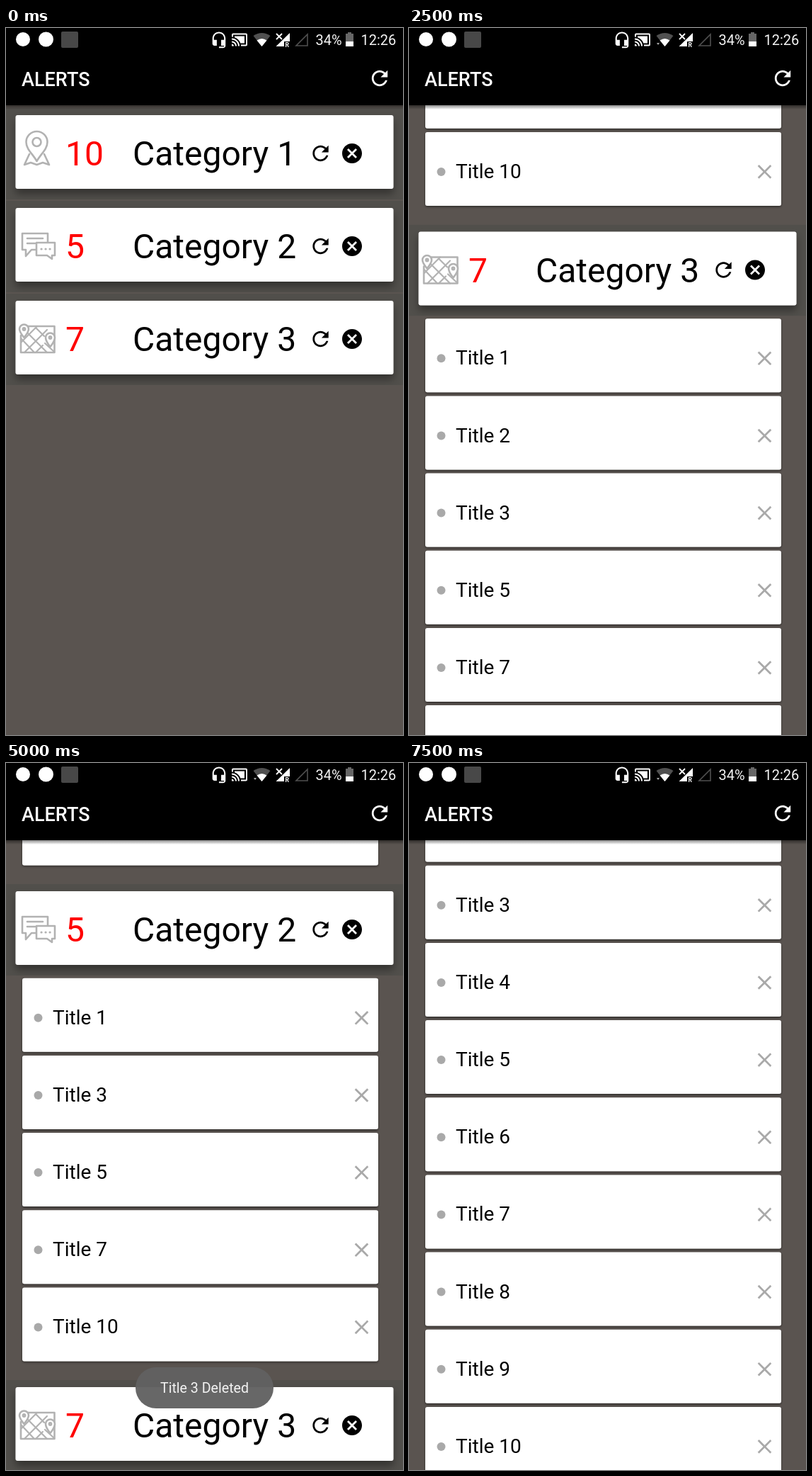
Animation of 561 by 998 pixels, one loop 8000 ms. Source, as an HTML page:

```html
<!DOCTYPE html>
<html lang="en">
<head>
<meta charset="utf-8">
<title>Alerts</title>
<style>
  html, body { margin: 0; width: 100%; height: 100%; overflow: hidden; background: #5a5450; }
  svg { display: block; width: 100vw; height: 100vh; }
  text { font-family: Roboto, "Noto Sans", sans-serif; }
  .head { font-size: 48px; }
  .item { font-size: 28px; }
  .status { font-size: 20px; fill: #f4f4f4; }
  .card { fill: #fff; }
  .line { fill: none; stroke: #b2b2b2; stroke-width: 2.6; stroke-linejoin: round; stroke-linecap: round; }
</style>
</head>
<body>
<svg viewBox="0 0 561 998" xmlns="http://www.w3.org/2000/svg">
  <defs>
    <linearGradient id="fade" x2="0" y2="1">
      <stop stop-opacity=".45"/><stop offset="1" stop-opacity="0"/>
    </linearGradient>
    <filter id="high" x="-5%" y="-20%" width="110%" height="150%">
      <feDropShadow dx="0" dy="7" stdDeviation="6" flood-opacity=".38"/>
    </filter>
    <filter id="low" x="-2%" y="-5%" width="104%" height="112%">
      <feDropShadow dx="0" dy="1.5" stdDeviation="1.6" flood-opacity=".5"/>
    </filter>
    <clipPath id="row"><rect y="-10" width="561" height="129"/></clipPath>

    <path id="refresh" transform="scale(1.4) translate(-12 -12)" d="M17.65 6.35C16.2 4.9 14.21 4 12 4c-4.42 0-7.99 3.58-7.99 8s3.57 8 7.99 8c3.73 0 6.84-2.55 7.73-6h-2.08c-.82 2.33-3.04 4-5.65 4-3.31 0-6-2.69-6-6s2.69-6 6-6c1.66 0 3.14.69 4.22 1.78L13 11h7V4l-2.35 2.35z"/>
    <path id="cancel" transform="scale(1.4) translate(-12 -12)" d="M12 2C6.47 2 2 6.47 2 12s4.47 10 10 10 10-4.47 10-10S17.53 2 12 2zm5 13.59L15.59 17 12 13.41 8.41 17 7 15.59 10.59 12 7 8.41 8.41 7 12 10.59 15.59 7 17 8.41 13.41 12 17 15.59z"/>
    <path id="close" transform="scale(1.4) translate(-12 -12)" d="M19 6.41L17.59 5 12 10.59 6.41 5 5 6.41 10.59 12 5 17.59 6.41 19 12 13.41 17.59 19 19 17.59 13.41 12z"/>

    <g id="icon0" class="line">
      <path d="M43.5 65C38 55 28.500 48 28.500 38a15 15 0 0 1 30 0C58.500 48 49 55 43.500 65z"/>
      <circle cx="43.500" cy="38" r="6"/>
      <path d="M33 55l-7 15 9-3 8.500 3 8.500-3 9 3-7-15"/>
    </g>
    <g id="icon1" class="line">
      <path d="M42 59H36l-8 9V59H23V36H59V48M30 43H52M30 50H41"/>
      <path d="M43 49H69V67H65V72L58 67H43z"/>
      <path d="M50 58h.1M56 58h.1M62 58h.1" stroke-width="3.200"/>
    </g>
    <g id="icon2" class="line">
      <path d="M31 36H68.500V73H21V49"/>
      <path d="M21 59L44 36M26 73L58 41M42 73L52 63M31 46L58 73M42 38L54 50M22 54L40 73M55 60L68 72" stroke-width="2.200"/>
      <path fill="#fff" d="M25.500 52q-6.500-8-6.500-12a6.500 6.500 0 0 1 13 0q0 4-6.500 12zM62.500 65q-6.500-8-6.500-13a6.500 6.500 0 0 1 13 0q0 5-6.500 13z"/>
      <circle cx="25.500" cy="40" r="1.600"/><circle cx="62.500" cy="52" r="1.600"/>
    </g>
  </defs>

  <rect width="561" height="998" fill="#5a5450"/>
  <g id="list"></g>
  <rect y="109" width="561" height="6" fill="url(#fade)"/>

  <g id="toast">
    <rect x="183" y="853" width="195" height="58" rx="29" fill="#616161" fill-opacity=".96"/>
    <text x="280.500" y="889" font-size="19.600" text-anchor="middle" fill="#f2f2f2">Title 3 Deleted</text>
  </g>

  <rect width="561" height="109"/>
  <text x="22" y="82" font-size="27" font-weight="500" fill="#fff">ALERTS</text>
  <use href="#refresh" x="0" y="0" transform="translate(528 71)" fill="#fff"/>

  <circle cx="24" cy="16" r="10" fill="#fff"/>
  <rect id="badge" x="78" y="5" width="24" height="23" rx="2" fill="#484848"/>
  <circle id="bubble" cx="56.500" cy="16" r="10.500" fill="#fff"/>
  <g fill="#fff">
    <path transform="translate(288.600 4.500) scale(1.030)" d="M12 1c-4.970 0-9 4.030-9 9v7c0 1.660 1.340 3 3 3h3v-8H5v-2c0-3.870 3.130-7 7-7s7 3.130 7 7v2h-4v8h4v1h-7v2h6c1.660 0 3-1.340 3-3V10c0-4.970-4.030-9-9-9z"/>
    <path transform="translate(318 4.500)" d="M1 18v3h3c0-1.660-1.340-3-3-3zm0-4v2c2.760 0 5 2.240 5 5h2c0-3.870-3.130-7-7-7zm18-7H5v1.630c3.960 1.280 7.090 4.410 8.370 8.370H19V7zM1 10v2c4.970 0 9 4.030 9 9h2c0-6.080-4.930-11-11-11zm20-7H3c-1.100 0-2 .9-2 2v3h2V5h18v14h-7v2h7c1.100 0 2-.9 2-2V5c0-1.100-.9-2-2-2z"/>
    <path fill="#505050" d="M361.500 26L349.500 11Q361.500 3 373.500 11z"/>
    <path d="M361.500 26L354.500 17.500Q361.500 12.500 368.500 17.500z"/>
    <path id="traffic" fill="#aaa" d="M350 21h4l-2 3z"/>
    <path d="M401 7V19H393V26H381.500z"/>
    <path d="M382 8l8 8m0-8l-8 8" stroke="#fff" stroke-width="1.800"/>
    <text x="394.500" y="26.500" font-size="8.500" font-weight="700">R</text>
    <path fill="none" stroke="#505050" stroke-width="1.600" d="M426 9V25H410z"/>
    <path fill="#666" d="M480 8h3V6h5v2h3v12h-11z"/>
    <path d="M480 19h11v7h-11z"/>
  </g>
  <text class="status" x="437.500" y="24">34%</text>
  <text class="status" x="501.500" y="24">12:26</text>
</svg>

<script>
const LOOP = 8000, PITCH = 109.15, FIRST = 122.8, CLOSED = 131, EXTRA = 154.3;
const TITLES = [
  [1, 2, 3, 4, 5, 6, 7, 8, 9, 10],
  [1, 3, 5, 7, 10],
  [1, 2, 3, 5, 7, 8, 10]
];
const LEFT = [5, 7, 10];

// [start ms, top of the list, number of open categories]
const STEPS = [
  [0, 123, 0],
  [500, 123, 1],
  [1500, -919.3, 2],
  [2000, -1064.8, 2],
  [2500, -1658.3, 3],
  [3000, -1851.8, 3],
  [3500, -1456.1, 3],
  [4000, -1064.8, 2],
  [5000, -1064.8, 2],
  [6000, -495.8, 1],
  [6500, -439.8, 1],
  [7000, -289.8, 1],
  [7500, -196.3, 1]
];

const $ = id => document.getElementById(id);
const within = (start, from, to) => start >= from && start < to;
const at = (y, body) => y < -150 || y > 1020 ? "" : `<g transform="translate(0 ${y.toFixed(1)})">${body}</g>`;
const icon = (name, x, y, fill) => `<use href="#${name}" transform="translate(${x} ${y})" fill="${fill}"/>`;

const header = (i, count) => `
  <g clip-path="url(#row)">
    <rect y="-10" width="561" height="129" fill="#514f4b"/>
    <rect class="card" x="13.5" y="0" width="534" height="104" rx="3" filter="url(#high)"/>
  </g>
  <use href="#icon${i}"/>
  <text class="head" x="84" y="71" fill="#f00">${count}</text>
  <text class="head" x="179" y="71">Category ${i + 1}</text>
  ${icon("refresh", 444.5, 54, "#000")}${icon("cancel", 489, 54, "#000")}`;

const item = n => `
  <rect class="card" x="23" y="0" width="503" height="104" rx="3" filter="url(#low)"/>
  <circle cx="45.500" cy="56" r="6" fill="#a9a9a9"/>
  <text class="item" x="66" y="65">Title ${n}</text>
  ${icon("close", 502.5, 56, "#a9a9a9")}`;

function listMarkup(start, top, open) {
  let y = top, out = "";
  TITLES.forEach((all, i) => {
    const titles = i === 1 && start >= 6000 ? LEFT : all;
    out += at(y, header(i, titles.length));
    if (i < open) {
      titles.forEach((n, k) => out += at(y + FIRST + k * PITCH, item(n)));
      y += titles.length * PITCH + EXTRA;
    } else {
      y += CLOSED;
    }
  });
  return out;
}

function show([start, top, open]) {
  $("list").innerHTML = listMarkup(start, top, open);
  $("toast").style.display = within(start, 5000, 6000) ? "" : "none";
  const sliding = within(start, 3500, 4000);
  $("bubble").setAttribute("cx", sliding ? 64 : 56.5);
  $("badge").setAttribute("x", sliding ? 70 : 78);
  $("traffic").style.display = start >= 500 ? "" : "none";
}

const begin = performance.now();
let current = null;

function tick() {
  const t = (performance.now() - begin) % LOOP;
  const step = STEPS.findLast(s => s[0] <= t);
  if (step !== current) show(current = step);
  requestAnimationFrame(tick);
}
tick();
</script>
</body>
</html>
```
